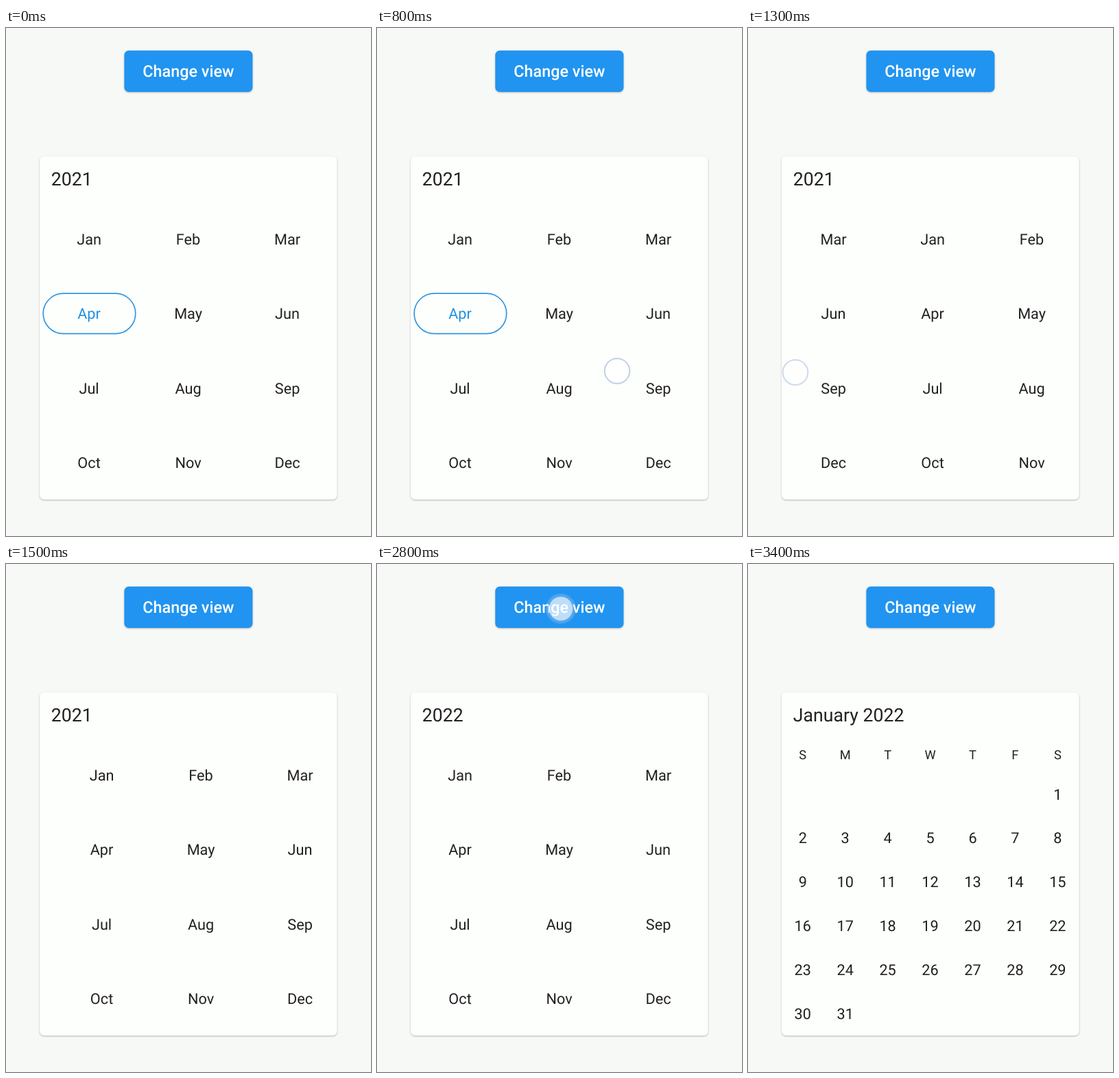
An HTML page that plays this animation: 532 by 739 pixels, repeating every 3.8 s.

```html
<!DOCTYPE html>
<html lang="en">
<head>
<meta charset="utf-8">
<title>Calendar view switch</title>
<style>
  html, body { margin: 0; width: 100%; height: 100%; overflow: hidden; background: #f7f9f7; }
  svg { display: block; width: 100vw; height: 100vh; }
  text { font-family: Roboto, sans-serif; font-size: 21.7px; fill: #212121; text-anchor: middle; text-rendering: geometricPrecision; }
  #title { font-size: 26.7px; text-anchor: start; }
  .weekday { font-size: 18.3px; }
  .label { font-size: 23.4px; font-weight: 500; fill: #fff; }
  .selected { fill: #2090e4; }
  .raised { filter: drop-shadow(0 1.4px .8px rgba(0, 0, 0, .27)); }
  .ring { fill: none; stroke: #86a2d0; stroke-opacity: .48; stroke-width: 1.8; filter: drop-shadow(0 0 1.2px rgba(150, 180, 225, .5)); }
</style>
</head>
<body>
<svg viewBox="0 0 532 739">
  <defs>
    <clipPath id="cardClip"><rect x="49" y="186.5" width="433.6" height="499.5" rx="6.5"/></clipPath>
    <clipPath id="buttonClip"><rect x="172.4" y="32.8" width="187" height="60.2" rx="6.5"/></clipPath>
  </defs>

  <rect class="raised" x="172.4" y="32.8" width="187" height="60.2" rx="6.5" fill="#2094f0"/>
  <g clip-path="url(#buttonClip)"><circle id="ripple" cx="268" cy="65" fill="#fff"/></g>
  <text class="label" x="265.8" y="71.1">Change view</text>

  <rect class="raised" x="49" y="186.5" width="433.6" height="499.5" rx="6.5" fill="#fdfffc"/>
  <text id="title" x="65.8" y="229">2021</text>
  <g clip-path="url(#cardClip)">
    <g id="years">
      <rect x="54.2" y="386.2" width="134.6" height="58.4" rx="29.2" fill="none" stroke="#2f96e4" stroke-width="1.7"/>
    </g>
    <g id="days"></g>
  </g>

  <g id="touch">
    <circle class="ring" r="18.2"/>
    <circle r="17.3" fill="#fff" fill-opacity=".64"/>
  </g>
</svg>

<script>
  const LOOP = 3800, STEP = 100, PAGE = 433.5, LEFT = 48.8;
  const DRAG_START = 800, RELEASE = 1300, SETTLED = 1700;
  const TAP = 2800, SWITCH = 2850, FADE_END = 3300;
  const MONTHS = 'Jan Feb Mar Apr May Jun Jul Aug Sep Oct Nov Dec'.split(' ');
  // Finger path, one point per step of the drag
  const PATH = [[350, 499], [322, 496], [255, 491], [173.5, 489], [108, 493], [69, 501]];

  const el = id => document.getElementById(id);
  const years = el('years'), days = el('days'), title = el('title');
  const touch = el('touch'), ripple = el('ripple');
  const clamp = v => Math.min(1, Math.max(0, v));
  const progress = (t, from, to) => clamp((t - from) / (to - from));

  function addText(parent, str, x, y, cls) {
    const node = document.createElementNS('http://www.w3.org/2000/svg', 'text');
    node.setAttribute('x', x);
    node.setAttribute('y', y);
    if (cls) node.setAttribute('class', cls);
    node.textContent = str;
    parent.appendChild(node);
  }

  for (let page = 0; page < 2; page++) {
    MONTHS.forEach((name, i) => {
      const x = LEFT + page * PAGE + (i % 3 + .5) * PAGE / 3;
      const y = 314.7 + Math.floor(i / 3) * 108.4;
      addText(years, name, x, y, page === 0 && i === 3 ? 'selected' : '');
    });
  }

  const dayX = col => LEFT + (col + .5) * PAGE / 7;
  [...'SMTWTFS'].forEach((d, i) => addText(days, d, dayX(i), 284, 'weekday'));
  for (let d = 1; d <= 31; d++) {
    const cell = d + 5;
    addText(days, d, dayX(cell % 7), 342.5 + Math.floor(cell / 7) * 63.9);
  }

  function fingerAt(t) {
    const pos = progress(t, DRAG_START, RELEASE) * (PATH.length - 1);
    const i = Math.min(Math.floor(pos), PATH.length - 2), f = pos - i;
    return PATH[i].map((v, k) => v + (PATH[i + 1][k] - v) * f);
  }

  function shiftAt(t) {
    if (t <= DRAG_START) return 0;
    if (t < RELEASE) return 349 - fingerAt(t)[0];
    const p = progress(t, RELEASE, SETTLED);
    return 285.5 + (PAGE - 285.5) * (1 - (1 - p) ** 3);
  }

  function touchOpacity(t) {
    if (t < 700) return 0;
    if (t < DRAG_START) return .6;
    if (t < RELEASE) return 1;
    if (t < 1500) return .8 - .5 * progress(t, RELEASE, 1400);
    if (t < TAP || t >= 3000) return 0;
    return 1 - .4 * progress(t, TAP, 2900);
  }

  function draw(now) {
    const t = Math.floor(now % LOOP / STEP) * STEP;
    const monthView = t >= SWITCH;

    years.setAttribute('transform', `translate(${-shiftAt(t)} 0)`);
    years.style.display = monthView ? 'none' : '';
    days.style.opacity = monthView ? .1 + .9 * progress(t, SWITCH, FADE_END) ** 1.7 : 0;
    title.textContent = monthView ? 'January 2022' : t >= SETTLED ? '2022' : '2021';

    const [x, y] = t >= TAP ? [268, 65] : fingerAt(t);
    touch.setAttribute('transform', `translate(${x} ${y})`);
    touch.style.opacity = touchOpacity(t);

    ripple.setAttribute('r', 22 + 80 * progress(t, TAP, 3050));
    ripple.style.opacity = t < TAP ? 0 : .16 * (1 - progress(t, 3000, 3400));
  }

  function tick() {
    draw(performance.now());
    requestAnimationFrame(tick);
  }
  tick();
</script>
</body>
</html>
```
